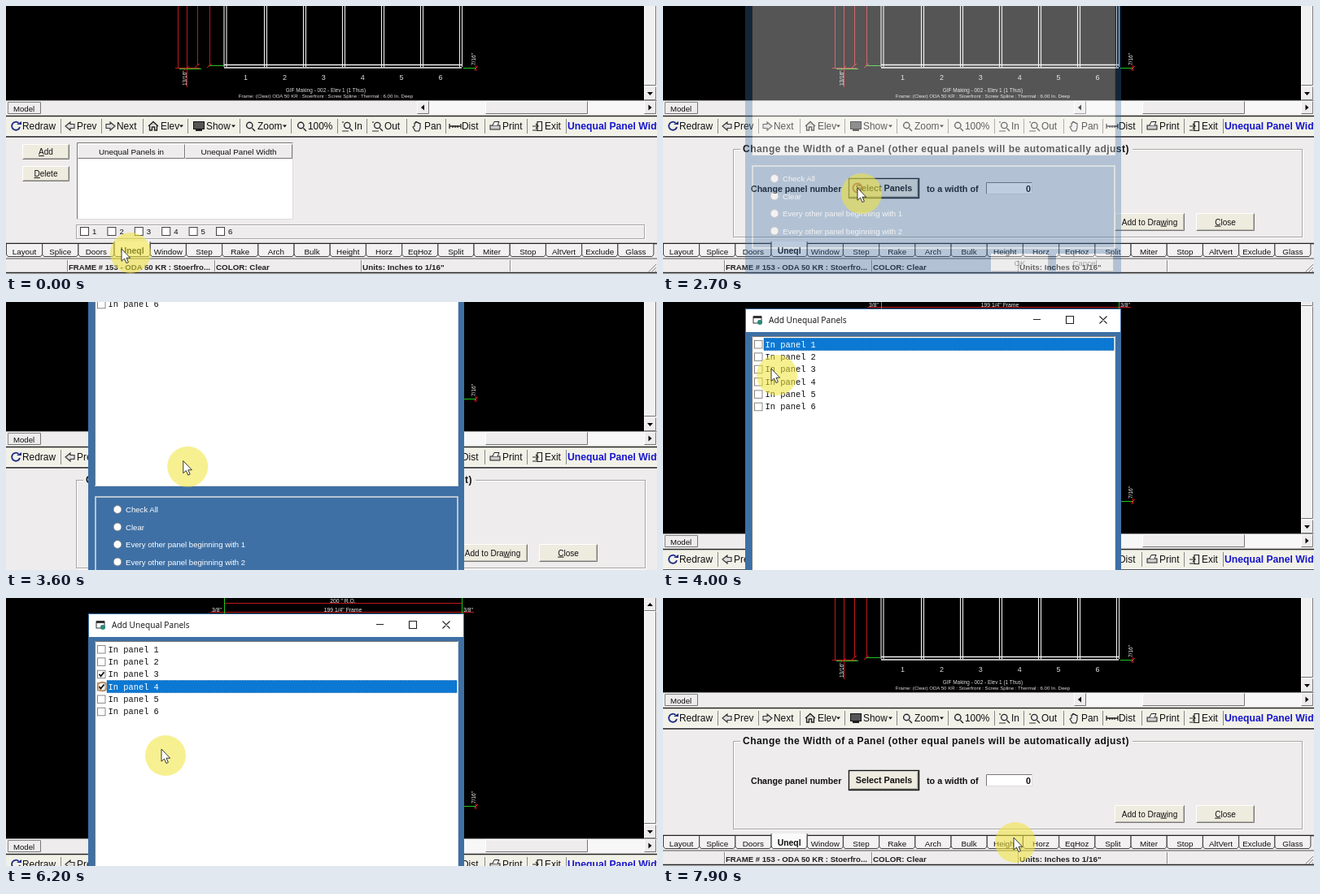
Recreate the animation shown at these times as an HTML page. Size 800 by 330 pixels, loop 8 s.

```html
<!DOCTYPE html>
<html lang="en">
<head>
<meta charset="utf-8">
<title>Unequal panels</title>
<style>
html, body { margin: 0; width: 100%; height: 100%; overflow: hidden; background: #000; }
svg { display: block; width: 800px; height: 330px; }
text { font-family: "Liberation Sans", Arial, sans-serif; white-space: pre; }
.b { font-weight: 700; }
.m { font-family: "Liberation Mono", monospace; }
.o { font-family: "Open Sans", sans-serif; }
</style>
</head>
<body>
<svg id="stage" viewBox="0 0 800 330"></svg>
<script>
const NS = 'http://www.w3.org/2000/svg';
const FACE = '#eeecec', BTN = '#eeebdf', BLUE = '#3e70a5';

function el(parent, tag, attrs) {
  const e = document.createElementNS(NS, tag);
  for (const k in attrs) e.setAttribute(k, attrs[k]);
  return parent.appendChild(e);
}
const group = p => el(p, 'g', {});
const rect = (p, x, y, w, h, fill, more) => el(p, 'rect', { x, y, width: w, height: h, fill, ...more });
const path = (p, d, stroke, w = 1, fill = 'none') => el(p, 'path', { d, stroke, 'stroke-width': w, fill });
const circle = (p, cx, cy, r, fill, more) => el(p, 'circle', { cx, cy, r, fill, ...more });
// y is the baseline; the part after "&" gets its first letter underlined
function text(p, x, y, str, size, fill = '#111', more = {}) {
  const t = el(p, 'text', { x, y, 'font-size': size, fill, ...more });
  const i = str.indexOf('&');
  if (i < 0) t.textContent = str;
  else {
    t.append(str.slice(0, i));
    el(t, 'tspan', { 'text-decoration': 'underline' }).textContent = str[i + 1];
    t.append(str.slice(i + 2));
  }
  return t;
}
const MID = { 'text-anchor': 'middle' };
const BOLD = { class: 'b' };

function bevel(p, x, y, w, h, fill, light = '#fff', dark = '#777') {
  rect(p, x, y, w, h, fill);
  path(p, `M${x + .5} ${y + h - .5}V${y + .5}H${x + w - .5}`, light);
  path(p, `M${x + w - .5} ${y + .5}V${y + h - .5}H${x + .5}`, dark);
}
function button(p, x, y, w, h, label, size = 10, more = {}) {
  bevel(p, x, y, w, h, BTN);
  path(p, `M${x + w - 1.5} ${y + 1.5}V${y + h - 1.5}H${x + 1.5}`, '#bbb8ae');
  text(p, x + w / 2, y + h / 2 + size * .36, label, size, '#111', { ...MID, ...more });
}
const sunken = (p, x, y, w, h) => bevel(p, x, y, w, h, '#fff', '#777', '#ddd');
const etched = (p, x, y, w, h) => {
  rect(p, x + 1.5, y + 1.5, w, h, 'none', { stroke: '#fff' });
  rect(p, x + .5, y + .5, w, h, 'none', { stroke: '#a8a6a4' });
};
function arrow(p, x, y, dir) {
  const e = path(p, 'M-3.5 -2H3.5L0 2Z', 'none', 0, '#000');
  e.setAttribute('transform', `translate(${x} ${y}) rotate(${dir})`);
}

const svg = document.getElementById('stage');
const world = group(svg);

// Drawing area
function drawing(g) {
  rect(g, 0, -200, 800, 316, '#000');
  const red = 'M211.5-150V76M222.5-150V100M235.5-150V73M250.5-150V73M208 76.5H238M268-173.5H560M251-162.5H575';
  path(g, red, '#c01820');
  path(g, 'M213 77.5H240M249 73.5H267M562 76.5H578M268.5-180V-140M560.5-180V-140', '#1fc41f');
  path(g, 'M577.5 73V80M575 79L580 74M219 79L225 74M232 76L238 71M247 76L253 71', '#e02020');
  for (let i = 0; i <= 6; i++) {
    const x = i ? 271 + i * 48 : 269.5;
    path(g, `M${x - 1.5}-140V75M${x + 1.5}-140V75`, '#eee', 1.1);
    if (i < 6) text(g, 294.5 + i * 47.9, 91, String(i + 1), 9, '#ddd', MID);
  }
  path(g, 'M268 72.5H560M268 76H560', '#f4f4f4', 1.6);
  text(g, 393, 106, 'GIF Making - 002 - Elev 1 (1 Thus)', 6.4, '#ddd', MID);
  text(g, 393, 113, 'Frame: (Clear) ODA 50 KR : Stoerfront : Screw Spline : Thermal : 6.00 In. Deep', 6.1, '#ddd', MID);
  text(g, 0, 0, '13/16"', 6.5, '#eee', { transform: 'translate(221.5 98) rotate(-90)' });
  text(g, 0, 0, '7/16"', 6.5, '#eee', { transform: 'translate(577 73) rotate(-90)' });
  text(g, 414, -174.5, '200 " R.O.', 6.8, '#eee', MID);
  text(g, 414, -163.5, '199 1/4" Frame', 6.8, '#eee', MID);
  for (const x of [259, 568]) text(g, x, -163.5, '3/8"', 6.8, '#eee', MID);
  // vertical scrollbar
  rect(g, 784, -200, 16, 316, '#f6f5f5');
  bevel(g, 784, -181, 15, 17, FACE);
  bevel(g, 784, -164, 15, 262, '#f2f1f1');
  bevel(g, 784, 99, 15, 17, FACE);
  arrow(g, 791.5, -172, 180);
  arrow(g, 791.5, 108, 0);
}

function modelBar(g) {
  rect(g, 0, 116, 800, 19, FACE);
  path(g, 'M0 116.5H800', '#999');
  bevel(g, 2, 118, 41, 15, FACE, '#888', '#777');
  text(g, 9, 129.5, 'Model', 9.6);
  rect(g, 505, 117, 295, 16, '#f8f7f7');
  bevel(g, 505, 117, 15, 16, FACE);
  bevel(g, 589, 117, 126, 16, FACE);
  bevel(g, 784, 117, 15, 16, FACE);
  arrow(g, 512, 125, 90);
  arrow(g, 791.5, 125, -90);
}

// Toolbar icons, each drawn around its own centre
const lens = 'M2.5 2.5L6 6M3-1A3.7 3.7 0 1 1-4.4-1A3.7 3.7 0 1 1 3-1';
const icons = {
  redo: g => { path(g, 'M3.5-4A5 5 0 1 0 5 1', '#1b2a86', 1.8); path(g, 'M1-2H7V-6Z', 'none', 0, '#1b2a86'); },
  prev: g => path(g, 'M-6 0L0-5V-2.5H5V2.5H0V5Z', '#333', 1.1, '#ddd'),
  next: g => path(g, 'M6 0L0-5V-2.5H-5V2.5H0V5Z', '#333', 1.1, '#ddd'),
  home: g => path(g, 'M-6 0L0-5.5L6 0M-4.5-1V5H-1.5V1H1.5V5H4.5V-1', '#222', 1.3, '#ccc'),
  screen: g => { rect(g, -6.5, -5.5, 13, 9, '#555', { stroke: '#111' }); rect(g, -4, 4, 8, 2, '#222'); },
  lens: g => path(g, lens, '#222', 1.4, '#eee'),
  box: g => { path(g, lens, '#222', 1.3, '#eee'); path(g, 'M-7 6H1M-6-6V-4', '#333', 1.2); },
  hand: g => path(g, 'M-2 6L-5 1L-3 0V-4H-1.5V-5.5H0V-4.5H2V-3.5H4V2L2.5 6Z', '#222', 1.1, '#eee'),
  ruler: g => path(g, 'M-7-3V3M7-3V3M-7 0H7M-3-1V2M0-1V2M3-1V2', '#222', 1.3),
  print: g => { rect(g, -6, -1, 12, 5, '#ccc', { stroke: '#222' }); path(g, 'M-3-1L-1-5.5H5L3-1', '#222', 1, '#fff'); },
  door: g => path(g, 'M0-5.5H5.5V5.5H0ZM-6 0H1M-2-3L1 0L-2 3M-6 5H0', '#222', 1.2)
};
// icon, icon x, label, label x, separator x
const tools = [
  ['redo', 12, 'Redraw', 20, 67], ['prev', 79, 'Prev', 87, 117], ['next', 128, 'Next', 136, 168],
  ['home', 181, 'Elev', 190, 223], ['screen', 237, 'Show', 246, 287], ['lens', 300, 'Zoom', 309, 350],
  ['lens', 363, '100%', 371, 407], ['box', 420, 'In', 428, 443], ['box', 457, 'Out', 465, 492],
  ['hand', 505, 'Pan', 514, 540], ['ruler', 552, 'Dist', 560, 588], ['print', 601, 'Print', 610, 640],
  ['door', 653, 'Exit', 662, 688]
];
function toolbar(g) {
  rect(g, 0, 134, 800, 28, '#f2f1e8');
  path(g, 'M0 134.5H800M0 159.5H800', '#fff');
  path(g, 'M0 135.5H800M0 161H800', '#222', 1.6);
  for (const [icon, ix, label, x, sep] of tools) {
    const i = group(g);
    i.setAttribute('transform', `translate(${ix} 148)`);
    icons[icon](i);
    const wide = 'Elev Show Zoom'.includes(label);
    text(g, x, 152, label, 11.9);
    if (wide) path(g, `M${sep - 10} 146.5h5l-2.5 3Z`, 'none', 0, '#111');
    path(g, `M${sep + .5} 139V157`, '#888');
  }
  text(g, 690, 151.5, 'Unequal Panel Width', 12.2, '#1616cc', BOLD);
}

const tabs = ['Layout', 'Splice', 'Doors', 'Uneql', 'Window', 'Step', 'Rake', 'Arch', 'Bulk', 'Height',
  'Horz', 'EqHoz', 'Split', 'Miter', 'Stop', 'AltVert', 'Exclude', 'Glass'];
function tabRow(g) {
  rect(g, 0, 290, 800, 40, FACE);
  path(g, 'M0 292.5H800', '#222', 1.3);
  tabs.forEach((name, i) => {
    const x = .5 + i * 44.2, on = name === 'Uneql';
    path(g, `M${x} ${on ? 290 : 293}V306L${x + 2} 308.5H${x + 42}L${x + 44} 306V${on ? 290 : 293}`, '#444', 1, on ? '#fbfafa' : '#f3f1f1');
    text(g, x + 22, on ? 305 : 306, name, on ? 10.4 : 9.9, '#111', { ...MID, class: on ? 'b' : '' });
  });
  path(g, 'M0 311H800', '#555');
  path(g, 'M0 328.5H800', '#222', 1.6);
  for (const x of [75, 256, 436, 619]) {
    path(g, `M${x}.5 313V327`, '#888');
    path(g, `M${x + 1}.5 313V327`, '#fff');
  }
  text(g, 77, 324.5, 'FRAME # 153 - ODA 50 KR : Stoerfro...', 9.6, '#222', BOLD);
  text(g, 258, 324.5, 'COLOR: Clear', 9.8, '#222', BOLD);
  text(g, 438, 324.5, 'Units: Inches to 1/16"', 9.9, '#222', BOLD);
  path(g, 'M789 328L799 318M793 328L799 322M797 328L799 326', '#888');
}

function listPage(g) {
  button(g, 20, 170, 58, 19, '&Add');
  button(g, 20, 197, 58, 19, '&Delete');
  sunken(g, 87, 168, 266, 95);
  bevel(g, 88, 170, 132, 18, FACE);
  bevel(g, 220, 170, 132, 18, FACE);
  text(g, 154, 182.5, 'Unequal Panels in', 9.9, '#111', MID);
  text(g, 286, 182.5, 'Unequal Panel Width', 9.9, '#111', MID);
  etched(g, 86, 269, 698, 17);
  for (let i = 0; i < 6; i++) {
    const x = 91 + i * 33.4;
    rect(g, x + .5, 272.5, 10, 10, '#fff', { stroke: '#444' });
    text(g, x + 15, 280.5, String(i + 1), 9.6);
  }
}

function widthPage(g) {
  etched(g, 86, 176, 699, 108);
  rect(g, 95, 170, 482, 12, FACE);
  text(g, 98, 180, 'Change the Width of a Panel (other equal panels will be automatically adjust)', 12, '#111', { ...BOLD, 'letter-spacing': .48 });
  text(g, 108, 228.5, 'Change panel number', 10.6, '#111', BOLD);
  text(g, 324, 228.5, 'to a width of', 10.8, '#111', BOLD);
  button(g, 229, 213, 85, 23, 'Select Panels', 10.8, BOLD);
  button(g, 555, 255, 86, 22, 'Add to Dra&wing');
  button(g, 655, 255, 72, 22, '&Close');
  sunken(g, 397, 217, 57, 15);
  const pick = rect(g, 446, 219, 7, 12, '#1d6fc0');
  const zero = text(g, 452, 228.5, '0', 10.8, '#111', { ...BOLD, 'text-anchor': 'end' });
  const ring = rect(g, 228.5, 212.5, 86, 24, 'none', { stroke: '#111', 'stroke-width': 1.4 });
  return { pick, zero, ring };
}

// Dialog
const rowY = i => -117 + i * 15.35;
function dialogBox(g) {
  rect(g, 101, -161, 462, 510, BLUE);
  rect(g, 102, -160, 460, 28, '#fff');
  rect(g, 111, -151, 10, 8, '#fff', { stroke: '#333' });
  rect(g, 111, -152, 10, 3, '#333');
  circle(g, 119, -144, 3, '#2a8a7a');
  text(g, 130, -143, 'Add Unequal Panels', 10.2, '#111', { class: 'o' });
  path(g, 'M455-147.5H464M536.5-151.5L545.5-142.5M545.5-151.5L536.5-142.5M495.5-151.5H504.5V-142.5H495.5Z', '#222', 1.1);
  sunken(g, 109, -127, 447, 311);
  const bar = rect(g, 124, 0, 430, 15, '#0b78d3', { stroke: '#0a5ca8', 'stroke-dasharray': '1 1' });
  const rows = [];
  for (let i = 0; i < 6; i++) {
    const y = rowY(i);
    rect(g, 112.5, y - 4.5, 9.5, 9.5, '#fff', { stroke: '#888' });
    const tick = path(g, `M114.5 ${y}L116.5 ${y + 2.5}L120.5 ${y - 2.5}`, '#111', 1.8);
    const label = text(g, 125.5, y + 3.5, 'In panel ' + (i + 1), 10.4, '#111', { class: 'm' });
    rows.push({ tick, label });
  }
  rect(g, 110, 197, 445, 101, 'none', { stroke: '#d5d9dd', 'stroke-width': 1.6 });
  ['Check All', 'Clear', 'Every other panel beginning with 1', 'Every other panel beginning with 2'].forEach((s, i) => {
    const y = 212.5 + i * 21.5;
    circle(g, 137, y, 4.9, '#fff', { stroke: '#777', 'stroke-width': .8 });
    text(g, 147, y + 3.5, s, 9.6, '#fff');
  });
  for (const [x, s] of [[403, 'OK'], [483, 'Cancel']]) {
    bevel(g, x, 305, 71, 22, '#f0eff0', '#fff', '#777');
    text(g, x + 35.5, 319.5, s, 9.8, '#111', MID);
  }
  return { bar, rows };
}

drawing(world);
modelBar(world);
toolbar(world);
rect(world, 0, 162, 800, 130, FACE);
const pageA = group(world), pageB = group(world);
listPage(pageA);
const field = widthPage(pageB);
tabRow(world);
const dlg = group(world);
const list = dialogBox(dlg);

const halo = circle(svg, 0, 0, 25, '#f0e53c', { opacity: .56 });
const click = circle(svg, 0, 0, 5.5, 'none', { stroke: '#b5722c', 'stroke-width': 2, opacity: .6 });
const mouse = path(svg, 'M0 0V15.2L3.5 12L6 17.6L8.4 16.5L6 11.2H10.6Z', '#222', .9, '#fff');

// time, tip x, tip y, halo offset x, y
const moves = [
  [0, 142, 299, 11, 5], [400, 142, 299, 11, 5], [1300, 75, 181, 0, 5], [1600, 75, 181, 0, 5],
  [2200, 189, 217, 5, 7], [2500, 239, 224, 5, 7], [3500, 239, 224, 5, 7], [4000, 133, 82, 7, 8],
  [4400, 127, 79, 6, 8], [4500, 119, 96, 6, 9], [4600, 119, 96, 6, 9], [5100, 250, 200, 5, 8],
  [5500, 290, 152, 5, 8], [5700, 119, 108, 6, 5], [5800, 119, 108, 6, 5], [6200, 191, 186, 5, 8],
  [6700, 602, 222, 5, 8], [6900, 396, 288, 4, 8], [7100, 431, 307, 1, 9], [7200, 431, 307, 1, 9],
  [7900, 431, 295, 2, 6], [8000, 431, 295, 2, 6]
];
const pans = [[0, 0], [3500, 0], [3800, 130], [4000, 169], [4300, 180], [6200, 180], [6400, 120], [6600, 20], [6700, 0], [8000, 0]];
const fades = [[0, 0], [2600, 0], [2900, 1], [7200, 1], [7400, 0], [8000, 0]];

function at(keys, t) {
  const i = keys.findIndex(k => k[0] > t);
  const a = keys[i - 1], b = keys[i];
  const f = (t - a[0]) / (b[0] - a[0]);
  return a.slice(1).map((v, n) => v + (b[n + 1] - v) * f);
}
const show = (e, on) => e.setAttribute('display', on ? 'inline' : 'none');
const between = (t, a, b) => t >= a && t < b;

function draw(time) {
  const t = Math.floor(time % 8000 / 100) * 100;
  const [x, y, dx, dy] = at(moves, t);
  const [pan] = at(pans, t), [fade] = at(fades, t);
  world.setAttribute('transform', `translate(0 ${Math.round(pan)})`);
  halo.setAttribute('transform', `translate(${x + dx} ${y + dy})`);
  mouse.setAttribute('transform', `translate(${x} ${y})`);

  show(pageA, t < 1400);
  show(pageB, t >= 1400);
  const selected = t < 2500;
  show(field.pick, selected);
  show(field.ring, !selected);
  field.zero.setAttribute('fill', selected ? '#fff' : '#111');

  show(dlg, fade > 0);
  dlg.setAttribute('opacity', fade);
  const row = t < 4700 ? 0 : t < 5900 ? 2 : 3;
  list.bar.setAttribute('y', rowY(row) - 7.5);
  list.rows.forEach((r, i) => {
    show(r.tick, i === 2 && t >= 4700 || i === 3 && t >= 5900);
    r.label.setAttribute('fill', i === row ? '#fff' : '#111');
  });

  const spot = between(t, 1400, 1700) ? [74, 181] : between(t, 2500, 3600) ? [239, 224]
    : between(t, 4700, 4900) ? [119, 96] : between(t, 5900, 6300) ? [118.5, 109] : null;
  show(click, spot);
  if (spot) click.setAttribute('transform', `translate(${spot})`);
}

const start = performance.now();
function loop() {
  draw(performance.now() - start);
  requestAnimationFrame(loop);
}
draw(0);
requestAnimationFrame(loop);
</script>
</body>
</html>
```
